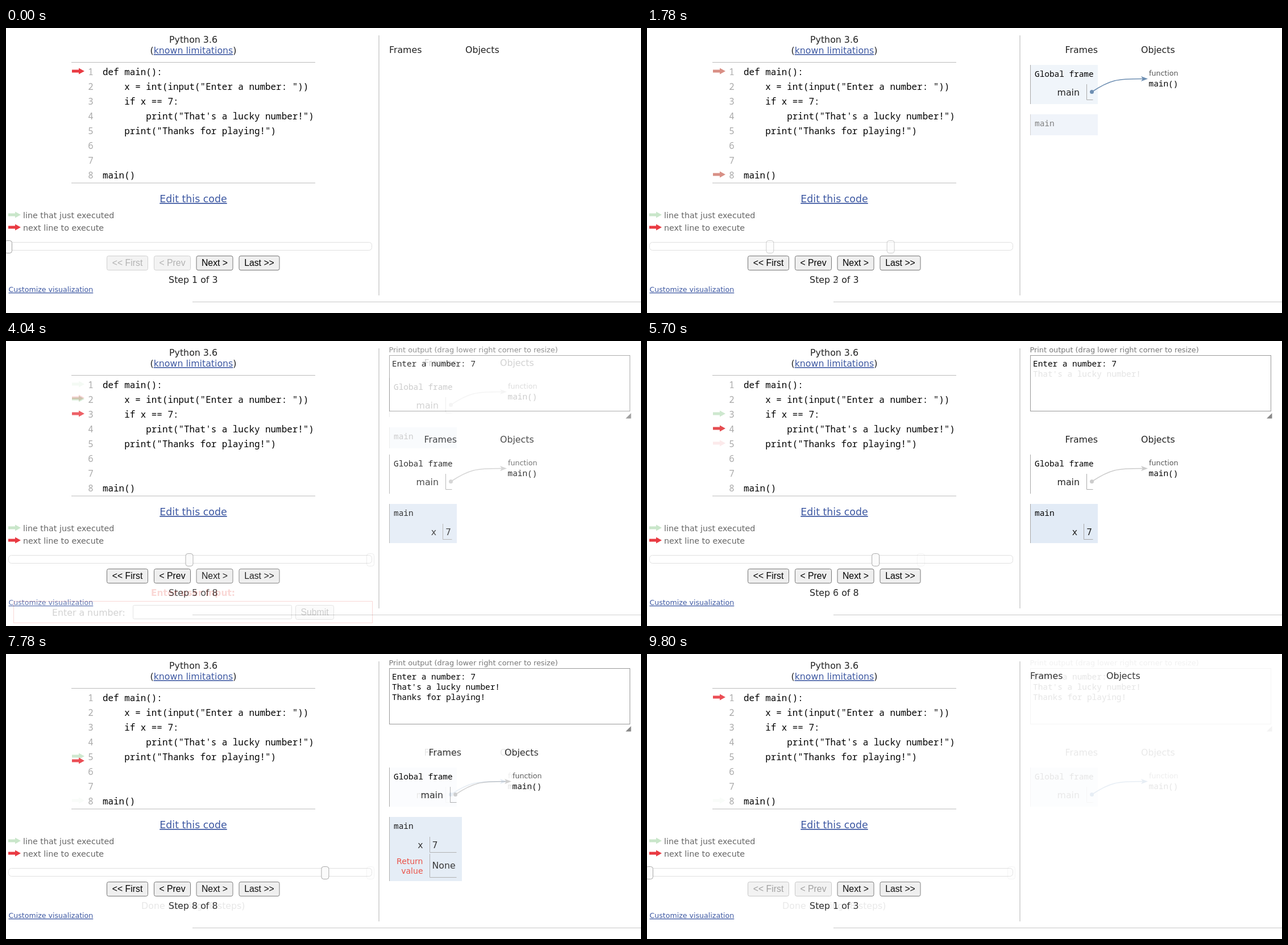
Recreate the animation shown at these times as an HTML page. Size 1117x502 px, loop 9860 ms.

```html
<!DOCTYPE html>
<html lang="en">
<head>
<meta charset="utf-8">
<title>Stepping through main()</title>
<style>
html, body { margin: 0; width: 100%; height: 100%; overflow: hidden; background: #fff; }
svg { position: absolute; left: 0; top: 0; width: 1117px; height: 502px; }
text { font: 15.8px "DejaVu Sans", Verdana, sans-serif; white-space: pre; fill: #222; }
.code { font: 15.9px "Noto Sans Mono", "DejaVu Sans Mono", monospace; fill: #000; }
.mono { font: 14.4px "Noto Sans Mono", "DejaVu Sans Mono", monospace; fill: #000; }
.num { fill: #aaa; }
.link { fill: #3d58a2; text-decoration: underline; }
.big { font-size: 17.4px; }
.small { font-size: 12.6px; }
.legend { font-size: 14.3px; fill: #666; }
.note { font-size: 12.85px; fill: #777; }
.kind { font-size: 12.6px; fill: #555; }
.ask { font-weight: bold; font-size: 15.45px; fill: #e93f34; }
.ret { font-size: 14px; fill: #e93f34; }
.btn { font: 15.8px "Liberation Sans", Arial, sans-serif; fill: #000; }
.off { fill: #b2b2b2; }
</style>
</head>
<body>
<script>
const GREEN = "#c9e6ca", RED = "#e93a42", ACTIVE = "#e2ebf6";
const LOOP = 9860, TICK = 60, STEPS = 10;

const text = (x, y, str, cls = "", anchor = "start") =>
  `<text x="${x}" y="${y}" class="${cls}" text-anchor="${anchor}">${str}</text>`;
const line = (d, color, width = 1) =>
  `<path d="${d}" fill="none" stroke="${color}" stroke-width="${width}"/>`;
const box = (x, y, w, h, stroke, fill = "none", r = 0) =>
  `<rect x="${x}" y="${y}" width="${w}" height="${h}" rx="${r}" stroke="${stroke}" fill="${fill}"/>`;
const shift = (x, y, body) => `<g transform="translate(${x} ${y})">${body}</g>`;
const arrow = (x, y, color) =>
  `<path d="M${x} ${y - 2.5}h12v-3l10 5.5-10 5.5v-3h-12z" fill="${color}"/>`;

function button(x, y, w, label, on = true) {
  return box(x + .5, y + .5, w - 1, 25, on ? "#767676" : "#d0d0d0", on ? "#efefef" : "#f3f3f3", 3) +
    text(x + w / 2, y + 17.5, label, on ? "btn" : "btn off", "middle");
}

function buttons(first, last) {
  return button(177, 401, 73, "&lt;&lt; First", !first) + button(260, 401, 65, "&lt; Prev", !first) +
    button(334.5, 401, 65, "Next &gt;", !last) + button(409.5, 401, 72, "Last &gt;&gt;", !last);
}

function slider(part) {
  return box(4.5, 377.5, 639, 14, "#e0e0e0", "#fff", 5) +
    box(4 + 637 * part - 6.5, 374.5, 13, 22, "#a0a0a0", "#fbfbfb", 4);
}

function frameBox(y, w, h, active) {
  return `<rect x="674" y="${y}" width="${w}" height="${h}" fill="${active ? ACTIVE : "#fff"}"/>` +
    line(`M674.5 ${y}v${h}`, "#a8a8a8");
}

// L-shaped border of a variable's value
const cell = (x, y, w, h) => line(`M${x}.5 ${y}v${h}.5h${w}`, "#aaa");

function pointer(color) {
  return `<circle cx="782.5" cy="112.5" r="3.5" fill="${color}"/>` +
    line("M782.5 112.5C815 91 826 89.5 872 89.5", color, 1.5) +
    `<path d="M881 89.5l-12-4.5 3 4.5-3 4.5z" fill="${color}"/>`;
}

function globalFrame(active, wide) {
  return frameBox(65, wide ? 128 : 119, 69, active) +
    text(682, 86, "Global frame", "mono") +
    shift(wide ? 8 : 0, 0,
      text(761, 119, "main", "", "end") + cell(773, 99, 11, 27) +
      text(883, 84, "function", "kind") + text(882.5, 103, "main()", "mono") +
      pointer(active ? "#0f5299" : "#ccc"));
}

function mainFrame(vars) {
  const wide = vars === 2;
  let s = frameBox(152, wide ? 128 : 119, [37, 69, 113][vars], true) + text(682, 173, "main", "mono");
  if (vars) {
    const dx = wide ? -23.5 : 0;
    s += text(757 + dx, 206.5, "x", "", "end") +
      cell(wide ? 745 : 768, 187, wide ? 47 : 16, 27) + text(773 + dx, 206.5, "7");
  }
  if (wide) {
    s += text(733.5, 234.5, "Return", "ret", "end") + text(733.5, 251.5, "value", "ret", "end") +
      cell(745, 217, 47, 41) + text(749.5, 242.5, "None");
  }
  return s;
}

function output(lines) {
  const said = ["Enter a number: 7", "That's a lucky number!", "Thanks for playing!"];
  return text(673.5, 19.5, "Print output (drag lower right corner to resize)", "note") +
    box(674.5, 25.5, 423, 98, "#999") +
    said.slice(0, lines).map((s, i) => text(679, 44.5 + 18 * i, s, "mono")).join("") +
    `<path d="M1099.5 127v9.5h-9.5z" fill="#888"/>`;
}

const headings = (a, b) => text(a, 44, "Frames") + text(b, 44, "Objects");

function heap(s) {
  if (!s.frames) return headings(674, 808);
  const wide = s.vars === 2, inMain = s.vars !== undefined;
  const body = shift(wide ? 8 : 0, 0, headings(735.5, 869)) +
    globalFrame(!inMain, wide) + (inMain ? mainFrame(s.vars) : "");
  return s.out ? output(s.out) + shift(0, 135, body) : body;
}

function footer(s) {
  if (s.ask) {
    return text(329, 449, "Enter user input:", "ask", "middle") +
      box(13.5, 458.5, 631, 38, "#e93f34") + text(81, 483.5, "Enter a number:") +
      box(223.5, 465.5, 279, 24, "#767676", "#fff", 2) + button(509, 465, 68, "Submit");
  }
  return text(329.3, 449, s.label, "", "middle") +
    text(4.5, 465, "Customize visualization", "link small") + line("M328 482.5H1117", "#c8c8c8");
}

const lineY = n => 50 + 26 * n;

// at: start of the fade into the state; done / next: marked code lines
const states = [
  { at: -LOOP, next: 1, part: 0, label: "Step 1 of 3", first: true },
  { at: 500, done: 1, next: 8, part: 1 / 3, label: "Step 2 of 3", frames: true },
  { at: 1540, done: 8, next: 1, part: 2 / 3, label: "Step 3 of 3", frames: true, vars: 0 },
  { at: 2580, done: 1, next: 2, dy: -2, part: 1, ask: true, last: true, frames: true, vars: 0 },
  { at: 3620, done: 2, next: 3, part: 4 / 8, label: "Step 5 of 8", frames: true, vars: 1, out: 1 },
  { at: 4660, done: 3, next: 4, part: 5 / 8, label: "Step 6 of 8", frames: true, vars: 1, out: 1 },
  { at: 5700, done: 4, next: 5, part: 6 / 8, label: "Step 7 of 8", frames: true, vars: 1, out: 2 },
  { at: 6740, done: 5, next: 5, dy: 8, part: 7 / 8, label: "Step 8 of 8", frames: true, vars: 2, out: 3 },
  { at: 7780, done: 8, part: 1, label: "Done running (8 steps)", last: true, frames: true, out: 3 }
];
states.push({ ...states[0], at: 9320 });

function scene(s) {
  return `<rect width="1117" height="502" fill="#fff"/>` +
    (s.done ? arrow(116, lineY(s.done), GREEN) : "") +
    (s.next ? arrow(116, lineY(s.next) + (s.dy || 0), RED) : "") +
    slider(s.part) + buttons(s.first, s.last) + footer(s) + heap(s);
}

function fixed() {
  const code = ["def main():", '    x = int(input("Enter a number: "))', "    if x == 7:",
    '        print("That\'s a lucky number!")', '    print("Thanks for playing!")', "", "", "main()"];
  return text(329.5, 26, "Python 3.6", "", "middle") +
    text(329.5, 45, '(<tspan class="link">known limitations</tspan>)', "", "middle") +
    line("M115 60.5H544M115 273H544", "#bbb") +
    code.map((c, i) => text(153.8, 82.7 + 26 * i, i + 1, "code num", "end") +
      text(170, 82.7 + 26 * i, c, "code")).join("") +
    text(329.5, 307, "Edit this code", "link big", "middle") +
    arrow(4, 329, GREEN) + text(30, 335, "line that just executed", "legend") +
    arrow(4, 351, RED) + text(30, 357, "next line to execute", "legend") +
    line("M656 13V471", "#ccc", 1.5);
}

function layer(body) {
  document.body.insertAdjacentHTML("beforeend", `<svg viewBox="0 0 1117 502">${body}</svg>`);
  return document.body.lastElementChild;
}

const layers = states.map(s => layer(scene(s)));
layer(fixed());

const start = performance.now();
function draw(now) {
  const t = Math.max(0, now - start) % LOOP;
  states.forEach((s, i) => {
    const step = Math.floor((t - s.at) / TICK) + 1;
    const a = Math.min(1, Math.max(0, step / STEPS));
    layers[i].style.opacity = a;
    layers[i].style.visibility = a ? "visible" : "hidden";
  });
  requestAnimationFrame(draw);
}
draw(start);
</script>
</body>
</html>
```
